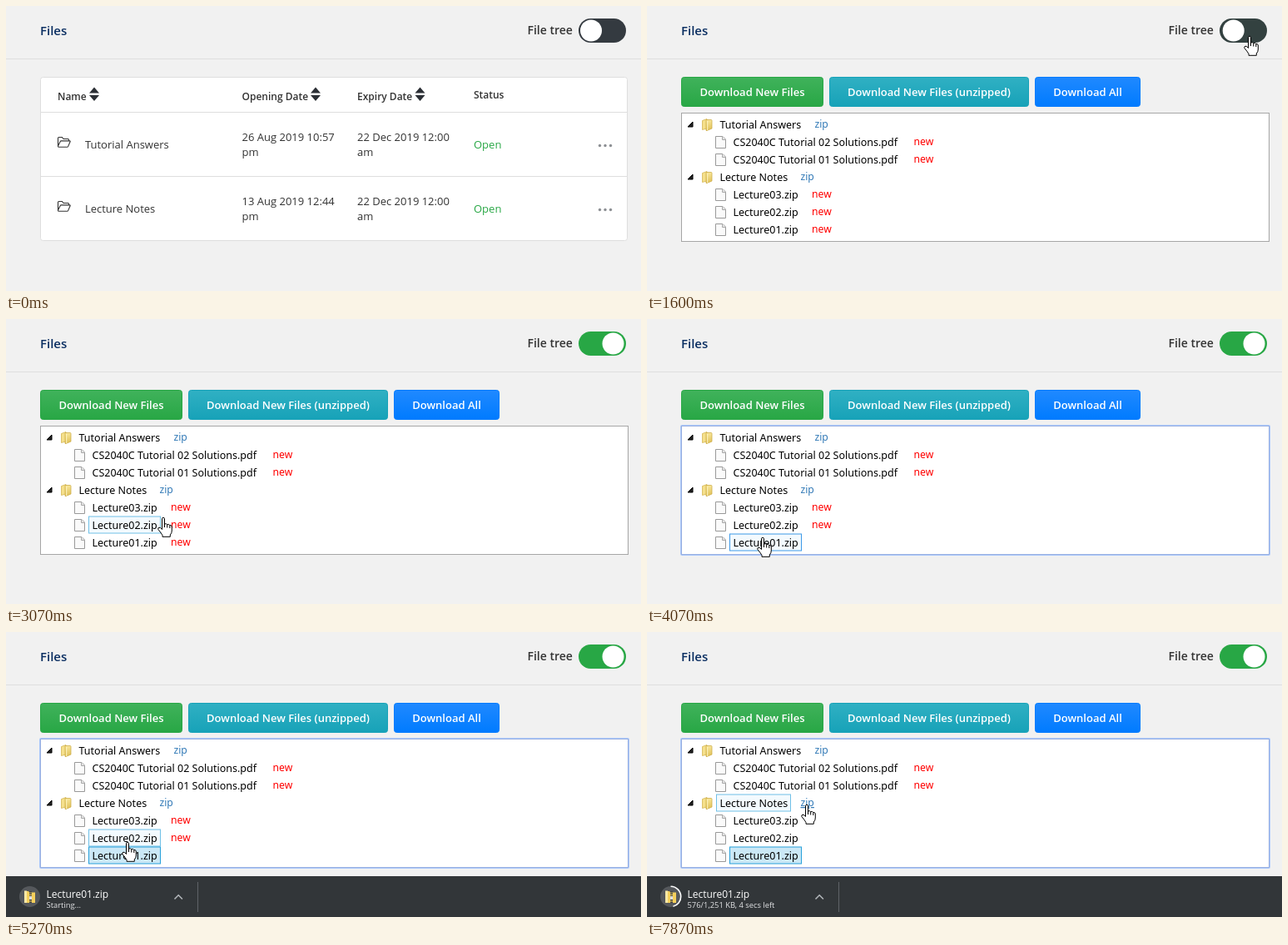
An HTML page that plays this animation: 763 by 342 pixels, repeating every 8 s.

```html
<!DOCTYPE html>
<html lang="en">
<head>
<meta charset="utf-8">
<title>File tree</title>
<style>
html, body { margin: 0; width: 100%; height: 100%; overflow: hidden; background: #f1f1f1; }
svg { display: block; width: 100%; height: 100%; }
text { font: 13px "Open Sans", sans-serif; fill: #333; white-space: pre; }
.head { font-size: 12px; font-weight: 600; }
.title { font-size: 15px; font-weight: 600; fill: #0b2f62; }
.label { font-size: 14px; font-weight: 600; }
.open { fill: #28a745; }
.btn { font-weight: 600; fill: #fff; text-anchor: middle; }
.node, .tag { font: 12.5px "Noto Sans", sans-serif; fill: #000; }
.tag { font-size: 12.2px; }
.zip { fill: #337ab7; }
.new { fill: #f00; }
.name { font-size: 12px; fill: #fff; }
.info { font-size: 9.4px; fill: #e3e4e6; }
.wait { font-size: 11.4px; fill: #9aa0a6; }
</style>
</head>
<body>
<svg id="stage" viewBox="0 0 763 342"></svg>
<script>
const LOOP = 8000, FPS = 15;
const rect = (x, y, w, h, attrs = '') => `<rect x="${x}" y="${y}" width="${w}" height="${h}" ${attrs}/>`;
const text = (x, y, str, cls = '', attrs = '') => `<text x="${x}" y="${y}" class="${cls}" ${attrs}>${str}</text>`;
const path = (d, attrs = '') => `<path d="${d}" ${attrs}/>`;
const group = (id, body) => `<g id="${id}">${body}</g>`;
const at = (x, y, body) => `<g transform="translate(${x} ${y})">${body}</g>`;

// Tree rows: centre y, title, title x, title end, tag, tag x, time the tag goes
const rows = [
  [142, 'Tutorial Answers', 87.5, 186, 'zip', 201.5],
  [163, 'CS2040C Tutorial 02 Solutions.pdf', 103.5, 304, 'new', 320.5],
  [184, 'CS2040C Tutorial 01 Solutions.pdf', 103.5, 304, 'new', 320.5],
  [205, 'Lecture Notes', 87.5, 168.5, 'zip', 184.5],
  [226, 'Lecture03.zip', 103.5, 181.5, 'new', 198, 7800],
  [247, 'Lecture02.zip', 103.5, 181.5, 'new', 198, 7800],
  [268, 'Lecture01.zip', 103.5, 181.5, 'new', 198, 4060]
].map(([y, title, x, end, tag, tagX, gone = Infinity]) => ({ y, title, x, end, tag, tagX, gone }));

const buttons = [
  [41, 171, 'Download New Files', '#40b25b', '#28a745'],
  [219, 240, 'Download New Files (unzipped)', '#30b0c3', '#17a2b8'],
  [466, 127, 'Download All', '#2089ff', '#007bff']
];

function sorter(x) {
  return path(`M${x} 104.5l6-7 6 7zM${x} 107l6 7 6-7z`, 'fill="#2b2f35"');
}

function listRow(y, title, opened) {
  const folder = path('M62.5 167.5V158.5q0-1 1-1h4l1.5 2h5.5q1 0 1 1v1.5M62.5 168l2.8-5.5q.3-.6 1-.6h10.2q1 0 .6.9l-2.4 5.6q-.4.9-1.2.9H63.5q-1 0-1-1z',
    'fill="none" stroke="#333" stroke-width="1.1"');
  const dots = [713.5, 720, 726.5].map(x => `<circle cx="${x}" cy="167.5" r="1.7" fill="#8c8f93"/>`).join('');
  return at(0, y, folder + dots + text(95, 171, title) +
    text(283.5, 162, opened) + text(283.5, 180, 'pm') +
    text(422, 162, '22 Dec 2019 12:00') + text(422, 180, 'am') + text(562, 171, 'Open', 'open'));
}

function treeRow(r, i) {
  const icon = r.tag === 'zip'
    ? path(`M55 ${r.y - 3}v6h-6z`, 'fill="#222" stroke="#000"') +
      at(66, r.y - 7,
        path('M.5 2.5L6 .5V12L.5 13.5z', 'fill="#f5e08c" stroke="#cfae45" stroke-width=".7"') +
        path('M5 1.5h6q1 0 1 1V12l-6 2.5H5z', 'fill="url(#gold)" stroke="#c9a63d" stroke-width=".7"') +
        path('M6.7 3V14', 'stroke="#fff6c6"'))
    : at(82, r.y - 7,
        path('M.5.5H9L12.5 4V14.5H.5z', 'fill="#fafafa" stroke="#999"') +
        path('M8.5.5V4.5H12.5', 'fill="#e4e4e4" stroke="#aaa"'));
  return icon + rect(r.x - 4, r.y - 10, r.end - r.x + 8, 20, `id="box${i}"`) +
    text(r.x, r.y + 5, r.title, 'node') +
    text(r.tagX, r.y + 4, r.tag, 'tag ' + r.tag, `id="tag${i}"`);
}

const gradient = (id, a, b) =>
  `<linearGradient id="${id}" x2="0" y2="1"><stop stop-color="${a}"/><stop offset="1" stop-color="${b}"/></linearGradient>`;

const defs = '<defs>' + gradient('gold', '#f8e69a', '#dfbf55') +
  buttons.map((b, i) => gradient('btn' + i, b[3], b[4])).join('') + '</defs>';

const list = rect(41.5, 85.5, 705, 196, 'rx="3" fill="#fff" stroke="#dedede"') +
  path('M42 127.5H746M42 204.5H746', 'stroke="#dedede"') +
  text(62, 113, 'Name', 'head') + sorter(100) +
  text(283.5, 113, 'Opening Date', 'head') + sorter(366) +
  text(422, 113, 'Expiry Date', 'head') + sorter(491.5) +
  text(562, 111, 'Status', 'head') +
  listRow(0, 'Tutorial Answers', '26 Aug 2019 10:57') +
  listRow(77, 'Lecture Notes', '13 Aug 2019 12:44');

const tree = buttons.map(([x, w, label, , edge], i) =>
    rect(x + .5, 85.5, w - 1, 35, `rx="3" fill="url(#btn${i})" stroke="${edge}"`) +
    text(x + w / 2, 108, label, 'btn')).join('') +
  rect(40.5, 127.5, 708, 156, 'id="focus" rx="1" fill="none" stroke="#a9c7fb"') +
  rect(41.5, 128.5, 706, 154, 'id="frame" fill="#fff" stroke-dasharray="1 1"') +
  rows.map(treeRow).join('');

const bar = rect(0, 293, 763, 49, 'fill="#323639"') +
  path('M230.5 300V336', 'stroke="#5f6368"') +
  path('M202.5 320.5l4.7-4.7 4.7 4.7', 'fill="none" stroke="#b4b8bc" stroke-width="1.5"') +
  '<circle cx="28.5" cy="317.5" r="12.5" fill="#55585c"/>' +
  '<circle id="ring" cx="28.5" cy="317.5" r="12.2" fill="none" stroke="#fff" stroke-width="1.6" pathLength="100" transform="rotate(-90 28.5 317.5)"/>' +
  path('M22 311h5l1 1.5h7V325H22z', 'fill="#f4cf5b"') +
  rect(22, 310.5, 3, 14.5, 'fill="#fbe9a6"') +
  path('M29.5 311V325', 'stroke="#444" stroke-width="3" stroke-dasharray="1.5 1"') +
  rect(28, 317, 3, 4, 'fill="#ddd"') +
  text(48.5, 319, 'Lecture01.zip', 'name') + text(48.5, 331, '', 'info', 'id="info"');

const bubble = rect(-1, .5, 329, 21, 'rx="1" fill="#35383c" stroke="#4b4f54"') +
  text(3.5, 15, 'Waiting for luminus.nus.edu.sg...', 'wait');

const ink = 'fill="#fff" stroke="#000" stroke-linejoin="round"';
const hand = path('M-1.5 14.5V1.8Q-1.5.3 0 .3T1.5 1.8V8q2-1 3.2.7 2-.9 3.1.8 2-.4 2.5 1.5V16q0 3-2 5V23.3H-1V21.5Q-3 18-6 14.7-6.8 12.6-5 12.2T-1.5 14.5z', ink) +
  path('M1.5 8V12M4.7 9V12.5M7.8 9.8V13', 'fill="none" stroke="#000"');
const arrow = path('M0 0V16.5L3.8 13 6.4 19 9 17.9 6.5 12H11.8z', ink);

const stage = document.getElementById('stage');
stage.innerHTML = defs + rect(0, 0, 763, 342, 'fill="#f1f1f1"') +
  path('M0 63.5H763', 'stroke="#dedede"') +
  text(41, 34.5, 'Files', 'title') + text(626.5, 34, 'File tree', 'label') +
  rect(688, 15, 57, 29, 'id="track" rx="14.5"') +
  '<circle id="knob" cy="29.5" r="13" fill="#fff"/>' +
  group('list', list) + group('tree', tree) + group('bar', bar) +
  group('bubble', bubble) + group('cursor', group('hand', hand) + group('arrow', arrow));

const el = {};
stage.querySelectorAll('[id]').forEach(n => el[n.id] = n);
const show = (id, on) => el[id].style.display = on ? '' : 'none';
const set = (id, attrs) => { for (const k in attrs) el[id].setAttribute(k, attrs[k]); };
const span = (t, a, b) => Math.min(1, Math.max(0, (t - a) / (b - a)));
const ease = p => p * p * (3 - 2 * p);
const mix = (a, b, p) => a + (b - a) * p;

// Cursor moves: start, end, from, bend, to
const moves = [
  [400, 860, [755, 5], [742, 22], [724, 36]],
  [2270, 3130, [724, 36], [170, 160], [189, 241]],
  [3140, 3530, [189, 241], [160, 248], [139, 262]],
  [4400, 4460, [139, 262], [139, 262], [139, 263]],
  [5070, 5860, [139, 263], [160, 228], [192, 207]]
];

function pointer(t) {
  const [a, b, p, q, r] = moves.filter(m => t >= m[0]).pop() || moves[0];
  const s = ease(span(t, a, b));
  return [0, 1].map(k => mix(mix(p[k], q[k], s), mix(q[k], r[k], s), s));
}

// Download progress: time, KB, seconds left
const progress = [[5530, 273, 7], [6330, 559, 3], [6800, 559, 4], [7800, 576, 4]];

function draw(t) {
  const [x, y] = pointer(t), isTree = t >= 1595, focused = t >= 4060;
  const slide = ease(span(t, 1540, 1930));
  const tint = [[52, 40], [58, 167], [64, 69]].map(([a, b]) => Math.round(mix(a, b, slide)));
  set('track', { fill: `rgb(${tint})` });
  set('knob', { cx: mix(703, 729.5, slide) });
  show('list', !isTree);
  show('tree', isTree);
  show('focus', focused);
  set('frame', { stroke: focused ? '#3c68c8' : '#555' });

  let onLink = (x > 688 && x < 745 && y > 15 && y < 44) ||
    (isTree && y > 85 && y < 121 && buttons.some(([bx, w]) => x > bx && x < bx + w));
  rows.forEach((r, i) => {
    const tagged = t < r.gone, right = tagged ? r.tagX + 25 : r.end + 5;
    const hover = isTree && Math.abs(y - r.y) <= 10.5 && x > r.x - 40 && x < right;
    const active = i === 6 && t >= 4125;
    const pressed = i === 6 && focused;
    onLink = onLink || hover;
    show('box' + i, hover || active);
    set('box' + i, {
      fill: active ? '#cbe8f6' : '#f3fafe',
      stroke: active ? '#26a0da' : pressed ? '#3c99e8' : '#70c0e7'
    });
    show('tag' + i, tagged);
    el['tag' + i].style.textDecoration = hover && r.tag === 'zip' && x > r.tagX ? 'underline' : '';
  });

  const barUp = t >= 4865;
  show('bar', barUp);
  show('bubble', t >= 4665 && t < 5125);
  set('bubble', { transform: `translate(0 ${barUp ? 271.5 : 320.5})` });
  const now = progress.filter(p => t >= p[0] - 5).pop();
  el.info.textContent = now ? `${now[1]}/1,251 KB, ${now[2]} secs left` : 'Starting...';
  show('ring', now);
  if (now) set('ring', { 'stroke-dasharray': `${now[1] / 12.51} 100` });

  show('cursor', t >= 395);
  set('cursor', { transform: `translate(${Math.round(x)} ${Math.round(y)})` });
  show('hand', onLink);
  show('arrow', !onLink);
}

const start = performance.now();
function tick() {
  const t = (performance.now() - start) % LOOP;
  draw(Math.floor((t + 4) * FPS / 1000) * 1000 / FPS);
  requestAnimationFrame(tick);
}
tick();
</script>
</body>
</html>
```
